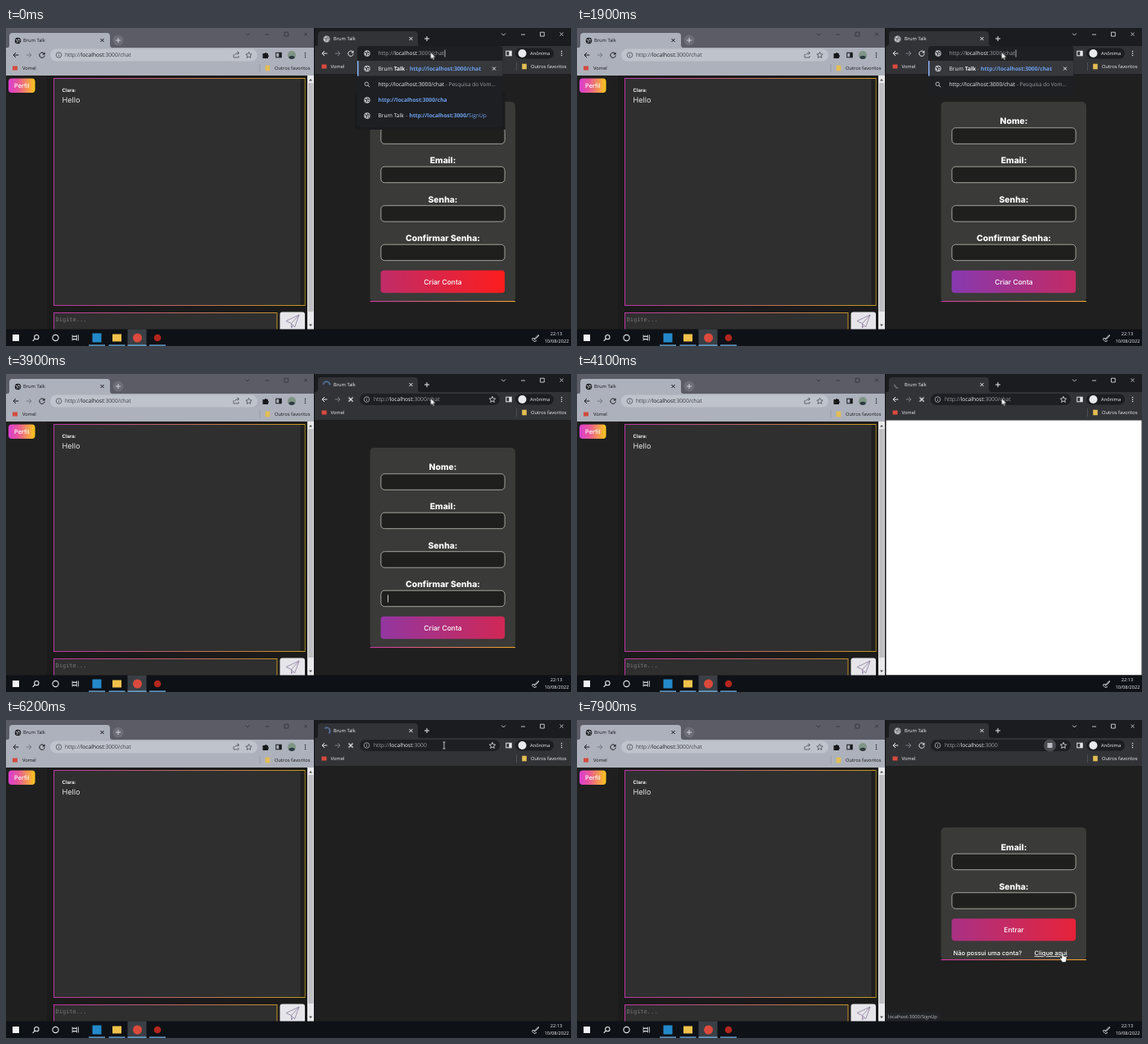
These frames come from a looping animation (690 px wide and 388 px high, 8 s). An HTML page:

```html
<!DOCTYPE html>
<html lang="pt-BR">
<head>
<meta charset="utf-8">
<title>Chat</title>
<style>
html, body { margin: 0; width: 100%; height: 100%; overflow: hidden; background: #1f1f1f }
svg { display: block; width: 690px; height: 388px }
text { font-family: "Open Sans", "Noto Sans", sans-serif; font-size: 5.75px; font-weight: 500; text-rendering: geometricPrecision; white-space: pre }
.url { font-size: 6.7px }
.page text { font-family: Inter, Lato, sans-serif }
.page .label { font-weight: 800; font-size: 10.4px; text-anchor: middle; fill: #fff }
.button { font-size: 8.5px; text-anchor: middle; fill: #fff }
.note { font-size: 7.5px; fill: #fff }
.clock { font-size: 5.6px; text-anchor: middle }
.line { fill: none; stroke: currentColor }
.b { font-weight: 700 }
.dim { fill: #9aa0a6 }
.link { fill: #6ea2f0 }
.field { fill: #1f1f1d; stroke: #b9b9b2; stroke-width: .85 }

/* One loop is 8 s: 1.25% = 100 ms */
.on { animation: 8s step-end infinite }
.extra { animation-name: extra }
.menu { animation-name: menu }
.bar { animation-name: bar }
.path { animation-name: path }
.busy { animation-name: busy }
.idle { animation-name: idle }
.signup { animation-name: signup }
.blank { animation-name: blank }
.login { animation-name: login }
.popup { animation-name: popup }
.hover { animation-name: hover }
.wait { animation-name: wait }
.active { animation-name: active }
.arrow { animation-name: arrow }
.beam { animation-name: beam }
.caret { animation: blink 1s step-end infinite }
.spin { animation: spin 8s infinite }
.shade1 { animation: shade1 8s infinite }
.shade2 { animation: shade2 8s step-end infinite }

@keyframes extra { 0% { opacity: 1 } 1.25%, 100% { opacity: 0 } }
@keyframes menu { 0% { opacity: 1 } 40%, 100% { opacity: 0 } }
@keyframes bar { 0% { opacity: 0 } 40%, 100% { opacity: 1 } }
@keyframes path { 0% { opacity: 1 } 77.5%, 100% { opacity: 0 } }
@keyframes busy { 0% { opacity: 0 } 40% { opacity: 1 } 82.5%, 100% { opacity: 0 } }
@keyframes idle { 0% { opacity: 1 } 40% { opacity: 0 } 82.5%, 100% { opacity: 1 } }
@keyframes signup { 0% { opacity: 1 } 51.25%, 100% { opacity: 0 } }
@keyframes blank { 0% { opacity: 0 } 51.25% { opacity: 1 } 77.5%, 100% { opacity: 0 } }
@keyframes login { 0% { opacity: 0 } 82.5%, 100% { opacity: 1 } }
@keyframes popup { 0% { opacity: 0 } 82.5% { opacity: 1 } 97.5%, 100% { opacity: 0 } }
@keyframes hover { 0% { opacity: 0 } 97.5%, 100% { opacity: 1 } }
@keyframes wait { 0% { opacity: 0 } 51.25% { opacity: 1 } 70%, 100% { opacity: 0 } }
@keyframes active { 0% { opacity: 1 } 51.25% { opacity: 0 } 70%, 100% { opacity: 1 } }
@keyframes blink { 0% { opacity: 1 } 40% { opacity: 0 } 90%, 100% { opacity: 1 } }
@keyframes arrow {
  0% { opacity: 1; transform: translate(518.5px, 29.5px) }
  63.75% { opacity: 0; transform: translate(518.5px, 29.5px) }
  90% { opacity: 1; transform: translate(563px, 38px) }
  91.25% { opacity: 1; transform: translate(589px, 46px) }
  97.5%, 100% { opacity: 0; transform: translate(589px, 46px) }
}
@keyframes beam {
  0% { opacity: 0; transform: translate(530px, 31px) }
  63.75% { opacity: 1; transform: translate(530px, 31px) }
  66.25% { opacity: 1; transform: translate(535px, 31px) }
  90%, 100% { opacity: 0; transform: translate(535px, 31px) }
}
@keyframes spin {
  0%, 40% { transform: rotate(90deg); animation-timing-function: steps(4) }
  51.25% { transform: none; animation-timing-function: steps(9) }
  70% { transform: rotate(-720deg); animation-timing-function: steps(10) }
  82.5%, 100% { transform: none }
}
@keyframes shade1 {
  0%, 1.875% { transform: translateX(-151px); animation-timing-function: ease }
  33.1% { transform: none; animation-timing-function: ease-in }
  38.75%, 100% { transform: translateX(-39px) }
}
@keyframes shade2 {
  0% { transform: none }
  85% { transform: translateX(-8px) }
  86.25% { transform: translateX(-15px) }
  90% { transform: translateX(-39px) }
  91.25% { transform: translateX(-50px) }
  97.5% { transform: translateX(-85px) }
  98.75%, 100% { transform: translateX(-94px) }
}
</style>
</head>
<body>
<svg viewBox="0 0 690 388">
<defs>
  <linearGradient id="sunset"><stop stop-color="#833ab4"/><stop offset="1" stop-color="#fd1d1d"/></linearGradient>
  <linearGradient id="edge" gradientUnits="userSpaceOnUse" x1="58" x2="365"><stop stop-color="#bd36a4"/><stop offset="1" stop-color="#c39a1f"/></linearGradient>
  <linearGradient id="base"><stop stop-color="#cf3aa6"/><stop offset="1" stop-color="#eda52c"/></linearGradient>
  <linearGradient id="candy"><stop stop-color="#da3fd0"/><stop offset=".35" stop-color="#e8559c"/><stop offset="1" stop-color="#fcc81a"/></linearGradient>
  <clipPath id="send1"><rect x="457.600" y="295.800" width="151.600" height="27.500" rx="4"/></clipPath>
  <clipPath id="send2"><rect x="457.600" y="242.300" width="151.600" height="27.200" rx="4"/></clipPath>
  <g id="globe"><circle r="3.700" fill="currentColor"/><path d="M-2.800-1.300L-.6-.5-.4.9-1.300 2.600M.6-2.800L.8-1.200 2.800-.6M1 1.300L2.300 1.600" class="line" style="stroke:var(--land)" stroke-width="1.100"/></g>
  <path id="back" class="line" d="M3.300 0H-3M0-3L-3 0 0 3"/>
  <g id="reload"><path class="line" d="M2.500-1.900A3.200 3.200 0 1 0 3.200.6"/><path d="M3.500-3.600V-.4H.3z" fill="currentColor"/></g>
  <path id="cross" class="line" d="M-2-2L2 2M2-2L-2 2"/>
  <path id="plus" class="line" d="M-3 0H3M0-3V3"/>
  <path id="star" class="line" stroke-width=".8" d="M0-3.700L1.100-1.200 3.700-.9 1.700.8 2.300 3.400 0 2 -2.300 3.400-1.700.8-3.700-.9-1.100-1.200z"/>
  <g id="info"><circle r="3.300" class="line" stroke-width=".8"/><path class="line" d="M0-.4V1.800M0-1.900V-1.100" stroke-width=".8"/></g>
  <g id="dots" fill="currentColor"><circle cy="-2.600" r=".75"/><circle r=".75"/><circle cy="2.600" r=".75"/></g>
  <g id="panel"><rect x="-3.200" y="-2.800" width="6.400" height="5.600" class="line"/><path d="M.3-2.800H3.200V2.800H.3z" fill="currentColor"/></g>
  <g id="lens"><circle cx="-.7" cy="-.7" r="2.200" class="line" stroke-width=".9"/><path class="line" d="M1 1L3.200 3.200"/></g>
  <g id="controls" class="line" stroke-width=".8"><path d="M-2.500-1L0 1.500 2.500-1M21.500.5H26.500M45-2.300H49.800V2.500H45z"/><use href="#cross" x="71"/></g>
  <path id="folder" d="M-2.800-3.300H2.800V3.300H-2.800z" fill="#e3bd53"/>
</defs>

<rect width="690" height="388" fill="#1f1f1f"/>

<!-- Left window -->
<g color="#17181c" fill="#17181c" style="--land:#a9adb6">
  <rect width="376" height="26" fill="#5b5c66"/>
  <path d="M0 24H2Q4 24 4 21V10Q4 6 8 6H123Q127 6 127 10V21Q127 24 130 24H376V58H0z" fill="#adb1bb"/>
  <use href="#globe" x="14.500" y="15.500"/>
  <text x="21" y="17.300">Brum Talk</text>
  <use href="#cross" x="117.500" y="15"/>
  <circle cx="137" cy="15" r="6.500" fill="#6d6e78"/>
  <use href="#plus" x="137" y="15" color="#d2d4da"/>
  <use href="#controls" x="295" y="7.500" color="#303138"/>
  <use href="#back" x="12" y="33"/>
  <use href="#back" transform="translate(28 33)scale(-1 1)" color="#747883"/>
  <use href="#reload" x="44" y="33"/>
  <rect x="54" y="25.500" width="253" height="15" rx="7.500" fill="#bfc3cc"/>
  <use href="#info" x="64.500" y="33" color="#4a4d55"/>
  <text class="url" x="72" y="35.400" fill="#3c3e45">http://<tspan fill="#17181c">localhost</tspan>:3000/chat</text>
  <path class="line" stroke-width=".8" d="M278-1V3H284V1M279.500 0Q280-2.500 284-2.500M282.500-4.500L284.700-2.500 282.500-.5" transform="translate(0 33)" style="color:#4a4d55"/>
  <use href="#star" x="296.500" y="33" color="#4a4d55"/>
  <path d="M313.500 31H316A1.300 1.300 0 0 1 318.500 31H320V33A1.300 1.300 0 0 1 320 35.500V37H313.500z"/>
  <use href="#panel" x="333" y="33"/>
  <circle cx="349" cy="33" r="5" fill="#7f9586"/><path d="M345 36A4.200 3.400 0 0 1 353 36A5 5 0 0 1 345 36" fill="#2d3a40"/>
  <use href="#dots" x="365.500" y="33"/>
  <rect x="8" y="46.500" width="6" height="5" fill="#d34a3f"/>
  <text x="20" y="51">Vomel</text>
  <path class="line" stroke-width=".6" d="M310 44V54" style="color:#868a95"/>
  <use href="#folder" x="319.500" y="49"/>
  <text x="328" y="51">Outros favoritos</text>
</g>
<g class="page">
  <rect x="50" y="58" width="318" height="310" fill="#1b1b1b"/>
  <rect x="3" y="61.500" width="32.500" height="17.500" rx="4" fill="url(#candy)"/>
  <text x="10" y="73" style="font-size:7.4px" fill="#fff">Perfil</text>
  <rect x="58.500" y="61.500" width="306.500" height="277" fill="#2f2f2f" stroke="url(#edge)"/>
  <rect x="359.500" y="62" width="5" height="276" fill="#202020"/>
  <text x="68.500" y="78.300" style="font-size:6px;font-weight:600" fill="#fff">Clara:</text>
  <text x="68.500" y="91" style="font-size:9.1px;font-weight:400" fill="#e4e4e4">Hello</text>
  <rect x="58.500" y="347.500" width="272.500" height="30" fill="#2f2f2f" stroke="url(#edge)"/>
  <text x="60.500" y="357.500" style="font:7px 'DejaVu Sans Mono',monospace" fill="#777">Digite...</text>
  <rect x="334.500" y="346.500" width="30.500" height="30" rx="3" fill="#e6e5ea"/>
  <path d="M342 357.500L358 350 352.500 365 348.500 360.500zM348.500 360.500L358 350M348.500 360.500V366L350.500 362.800" fill="none" stroke="#8d7c9c" stroke-width=".8"/>
  <rect x="368" y="58" width="8" height="310" fill="#e9e9eb"/>
  <rect x="369" y="67" width="6.500" height="279" fill="#bfbfc2"/>
  <path d="M370 64.500L372 62 374 64.500zM370 361.500L372 364 374 361.500z" fill="#505050"/>
</g>
<path d="M376.500 0V368" stroke="#101113"/>

<!-- Right window -->
<g color="#e8eaed" fill="#f1f2f4" style="--land:#323337">
  <rect x="377" width="313" height="24" fill="#1b1c1f"/>
  <path d="M377 22H378Q381 22 381 19V8Q381 4 385 4H499Q503 4 503 8V19Q503 22 506 22H690V56H377z" fill="#323337"/>
  <use class="on idle" href="#globe" x="391.500" y="13.500"/>
  <g class="on busy"><g transform="translate(391.500 13.500)"><g class="spin">
    <path class="on active line" style="color:#6d9be0" d="M-3.800 1A3.900 3.900 0 0 1 3.500-1.800" stroke-width="1.100"/>
    <path class="on wait line" style="color:#a9adb3" d="M-3.500-.5A3.500 3.500 0 0 0 .5 3.500"/>
  </g></g></g>
  <text x="400" y="15.300">Brum Talk</text>
  <use href="#cross" x="494.500" y="13"/>
  <use href="#plus" x="514" y="13"/>
  <use href="#controls" x="607.500" y="7.500"/>
  <use href="#back" x="389" y="31"/>
  <use href="#back" transform="translate(405 31)scale(-1 1)" color="#7c8086"/>
  <use class="on idle" href="#reload" x="421" y="31"/>
  <use class="on busy" href="#cross" transform="translate(421 31)scale(1.300)"/>
  <use href="#panel" x="614" y="31"/>
  <rect x="622" y="24.500" width="47" height="13" rx="6.500" fill="#1c1d20"/>
  <circle cx="630.500" cy="31" r="5" fill="#e8eaed"/>
  <text x="640" y="33">Anônima</text>
  <use href="#dots" x="678.500" y="31"/>
  <rect x="385.500" y="44.500" width="6" height="5" fill="#d9493e"/>
  <text x="396.500" y="49">Vomel</text>
  <path class="line" stroke-width=".6" d="M623.500 42V52" style="color:#606368"/>
  <use href="#folder" x="633" y="47"/>
  <text x="641" y="49">Outros favoritos</text>

  <g class="on bar">
    <rect x="432" y="24" width="171" height="14" rx="7" fill="#1e1f22"/>
    <use href="#info" x="440.500" y="31" color="#aeb2b8"/>
    <text class="url dim" x="449" y="33.400">http://<tspan fill="#f1f2f4">localhost</tspan>:3000<tspan class="on path">/chat</tspan></text>
    <use href="#star" x="594" y="31"/>
    <g class="on login"><circle cx="577.500" cy="31" r="7.500" fill="#4a4c50"/><rect x="574.500" y="28" width="6" height="6" fill="#b9bdc3"/></g>
  </g>
</g>

<g class="page">
  <g class="on signup">
    <rect x="444.500" y="90" width="177.500" height="244" rx="5" fill="#3a3a38"/>
    <rect x="444.500" y="333" width="177.500" height="1.100" fill="url(#base)"/>
    <text class="label" x="533.500" y="117.300">Nome:</text>
    <text class="label" x="533.500" y="164.900">Email:</text>
    <text class="label" x="533.500" y="212.600">Senha:</text>
    <text class="label" x="533.500" y="260">Confirmar Senha:</text>
    <rect class="field" x="457.900" y="121.800" width="151.200" height="19.500" rx="4.500"/>
    <rect class="field" x="457.900" y="169.200" width="151.200" height="19.500" rx="4.500"/>
    <rect class="field" x="457.900" y="216.700" width="151.200" height="19.500" rx="4.500"/>
    <rect class="field" x="457.900" y="264.200" width="151.200" height="19.500" rx="4.500"/>
    <path class="on bar" d="M466.500 269.500V278.500" stroke="#fff" stroke-width=".8"/>
    <g clip-path="url(#send1)"><rect class="shade1" x="457.500" y="295" width="303" height="29" fill="url(#sunset)"/></g>
    <text class="button" x="533.500" y="312.900">Criar Conta</text>
  </g>
  <rect class="on blank" x="377.500" y="56.500" width="312" height="311" fill="#fff"/>
  <g class="on login">
    <rect x="444.500" y="131" width="177.500" height="162" rx="5" fill="#3a3a38"/>
    <rect x="444.500" y="292" width="177.500" height="1.100" fill="url(#base)"/>
    <text class="label" x="533.500" y="158.900">Email:</text>
    <text class="label" x="533.500" y="206.500">Senha:</text>
    <rect class="field" x="457.900" y="163.200" width="151.200" height="19.500" rx="4.500"/>
    <rect class="field" x="457.900" y="210.700" width="151.200" height="19.500" rx="4.500"/>
    <g clip-path="url(#send2)"><rect class="shade2" x="457.500" y="242" width="303" height="28" fill="url(#sunset)"/></g>
    <text class="button" x="533.500" y="258.900">Entrar</text>
    <text class="note" x="459.500" y="287">Não possui uma conta?</text>
    <text class="note" x="558.500" y="287" text-decoration="underline">Clique aqui</text>
  </g>
</g>

<!-- Address suggestions -->
<g class="on menu" color="#c4c8cc" fill="#f1f2f4" style="--land:#25262a">
  <path class="on extra" d="M426 80H609.500V124H426z" fill="#1a1b1d" opacity=".5"/>
  <path class="on extra" d="M429 78H606.500V117Q606.500 121 602.500 121H433Q429 121 429 117z" fill="#1e1f22"/>
  <path d="M433 22H602.500Q606.500 22 606.500 26V78Q606.500 82 602.500 82H433Q429 82 429 78V26Q429 22 433 22z" fill="#1e1f22"/>
  <rect x="429" y="40" width="177.500" height="18.500" fill="#36383c"/>
  <rect x="429" y="40" width="1.500" height="18.500" fill="#8ab4f8"/>
  <use href="#globe" x="441" y="31"/>
  <text class="url dim" x="454.500" y="33.400">http://<tspan fill="#f1f2f4">localhost</tspan>:3000/chat</text>
  <path class="caret" d="M536 26.500V35.500" stroke="#e8eaed" stroke-width=".7"/>
  <use href="#globe" x="441" y="49.500"/>
  <text class="url" x="454.500" y="52">Brum <tspan class="b">Talk</tspan><tspan class="dim" x="488.500">-</tspan><tspan class="link b" x="493">http://localhost:3000/chat</tspan></text>
  <use href="#cross" x="596" y="49.500" color="#e8eaed"/>
  <use href="#lens" x="441" y="69"/>
  <text class="url" x="454.500" y="71.300">http://localhost:3000/chat<tspan class="dim" style="font-size:6.5px"> - Pesquisa do Vom...</tspan></text>
  <g class="on extra">
    <use href="#globe" x="441" y="88"/>
    <text class="url link b" x="454.500" y="90.400">http://localhost:3000/cha</text>
    <use href="#globe" x="441" y="107"/>
    <text class="url" x="454.500" y="109.400">Brum Talk<tspan class="dim" x="488">-</tspan><tspan class="link b" x="492.500">http://localhost:3000/</tspan><tspan class="link">SignUp</tspan></text>
  </g>
</g>

<!-- Translation bubble -->
<g class="on popup" color="#c4c7cb">
  <rect x="431.500" y="40" width="171" height="46" rx="2" fill="#28292c"/>
  <rect x="431.500" y="62" width="171" height="24" rx="2" fill="#38393d"/>
  <text class="b" x="449.500" y="52" fill="#8ab4f8">inglês</text>
  <text class="b" x="487" y="52" fill="#9aa0a6">português</text>
  <rect x="439" y="58" width="38" height="1.200" fill="#8ab4f8"/>
  <use href="#dots" x="574.500" y="50"/>
  <use href="#cross" x="590.500" y="50"/>
  <text x="439.500" y="76" fill="#686b70">Vomela Translate</text>
</g>

<g class="on hover">
  <path d="M377 357H442Q444 357 444 359V368H377z" fill="#222326"/>
  <text x="380" y="364.300" fill="#bdc1c6">localhost:3000/SignUp</text>
</g>

<!-- Taskbar -->
<g color="#e6e8ea" fill="#f1f2f4">
  <rect y="367.500" width="690" height="20.500" fill="#0e1116"/>
  <rect x="148.500" y="367.500" width="23" height="20.500" fill="#3a3f45"/>
  <rect x="8" y="374" width="8" height="8"/>
  <use href="#lens" transform="translate(36.500 378)rotate(90)scale(1.200)"/>
  <circle cx="60.500" cy="378" r="3.600" class="line" stroke-width="1.100"/>
  <path class="line" stroke-width=".8" d="M81 374.500V376H86.500V374.500M81 381.500V380H86.500V381.500M81 376.500H86.500V379.500H81zM88.500 374.500V381.500"/>
  <rect x="105.500" y="372.500" width="11" height="11" fill="#2489ca"/>
  <rect x="130" y="373.500" width="11" height="9" fill="#f2c14b"/>
  <circle cx="160.500" cy="378" r="5.500" fill="#db4a3c"/>
  <circle cx="185" cy="378" r="4.300" fill="#b3261e"/>
  <path d="M101 387.200H121M125.500 387.200H145.500M148.500 387.200H171.500M175 387.200H195" stroke="#76b9ed" stroke-width="1.300"/>
  <path class="line" stroke-width=".9" d="M650.500 374L646 378.500 645 380 646.800 379.300 651 375M646 379.500Q641.500 377 643 380.500T648 381.500"/>
  <text class="clock" x="672" y="375.300">22:13</text>
  <text class="clock" x="672.500" y="384">10/08/2022</text>
</g>

<!-- Pointers -->
<path class="on arrow" d="M0 0V8.500L2 6.700 3.400 9.600 4.800 9 3.500 6.200H6.200z" fill="#fff" stroke="#000" stroke-width=".5"/>
<path class="on beam" d="M-1.500-4H1.500M0-4V4M-1.500 4H1.500" fill="none" stroke="#e8e8e8" stroke-width=".8"/>
<path class="on hover" d="M592 284.500Q593 283.300 594 284.500V288L597.500 289Q598.300 289.500 598 291L597 295.500H592.500L590 291.500Q589.300 290 590.800 290L592 291z" fill="#fff" stroke="#000" stroke-width=".5"/>
</svg>
</body>
</html>
```
